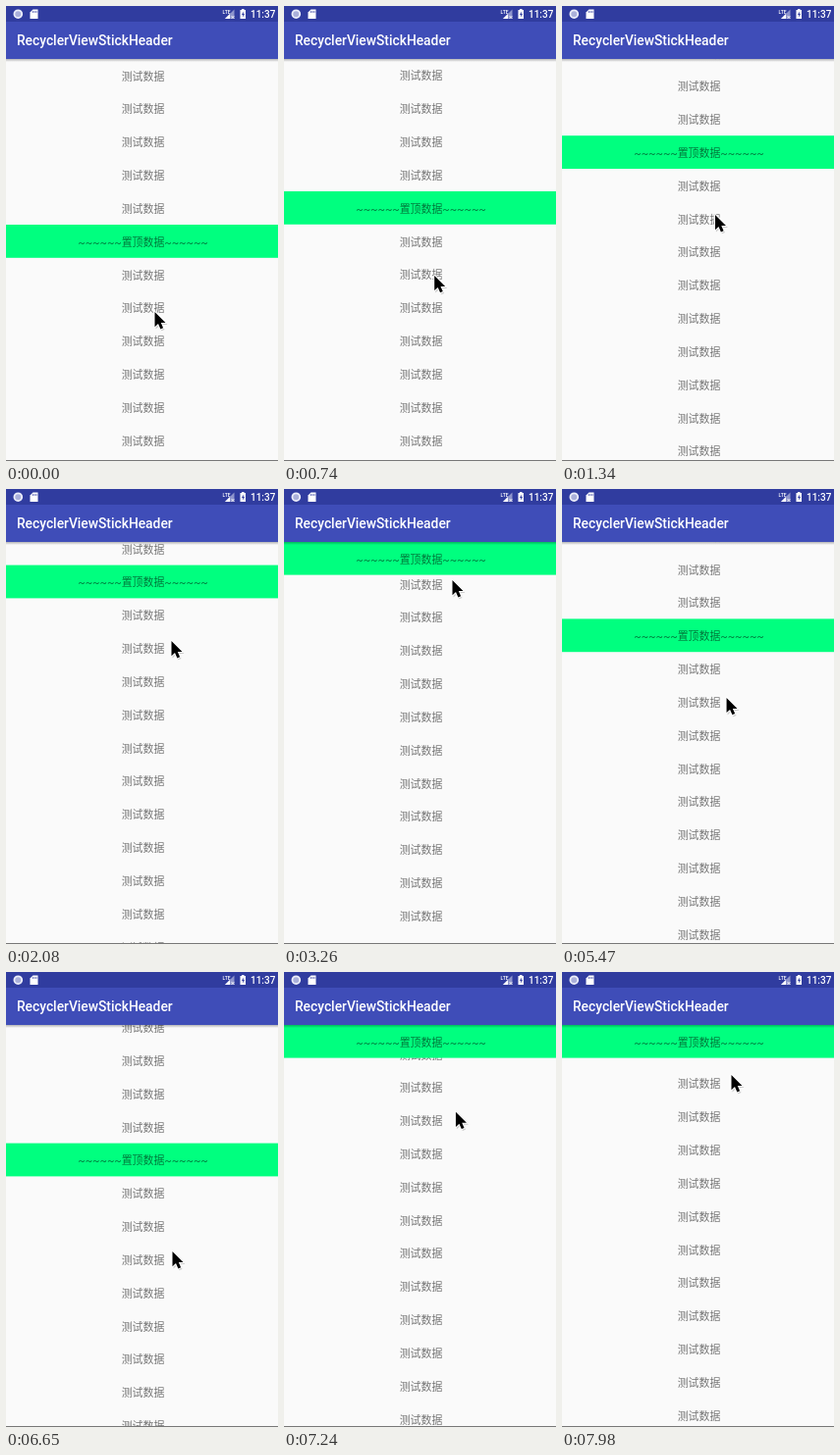
An HTML page for the animation above (8000 ms loop, 277 by 464 pixels).

```html
<!DOCTYPE html>
<html lang="zh">
<head>
<meta charset="utf-8">
<title>RecyclerViewStickHeader</title>
<style>
  html, body { margin: 0; width: 100%; height: 100%; overflow: hidden; background: #fafafa; }
  svg { display: block; }
  text { font-family: Roboto, "Noto Sans CJK SC", "Noto Sans CJK", sans-serif; }
  .row { font-size: 10.9px; fill: rgba(0, 0, 0, .54); text-anchor: middle; }
  .bar { font-weight: 500; fill: #fff; }
</style>
</head>
<body>
<svg width="277" height="464" viewBox="0 0 277 464">
  <defs>
    <linearGradient id="shade" x2="0" y2="1">
      <stop offset="0" stop-opacity=".28"/>
      <stop offset="1" stop-opacity="0"/>
    </linearGradient>
  </defs>
  <rect width="277" height="464" fill="#fafafa"/>
  <g id="list"></g>
  <g id="header">
    <rect y="-17.4" width="277" height="33.8" fill="#00ff7f"/>
    <text class="row" x="139.5" y="4.4">~~~~~~置顶数据~~~~~~</text>
  </g>
  <rect y="463" width="277" height="1" fill="#777"/>

  <rect y="54" width="277" height="3" fill="url(#shade)"/>
  <rect width="277" height="54" fill="#3f4db8"/>
  <rect width="277" height="16" fill="#303c9f"/>
  <text class="bar" x="11" y="40" font-size="13.8">RecyclerViewStickHeader</text>
  <circle cx="12.3" cy="8.2" r="3.9" fill="#aab0da" stroke="#eceefa" stroke-width="1.8"/>
  <path d="M27.5 3.5H32.5V13H24.5V6.5Z" fill="#fff"/>
  <path d="M27.4 5v2M29.2 5v2M31 5v2" stroke="#303c9f" stroke-width=".7"/>
  <text class="bar" x="220.5" y="7.5" font-size="5">LTE</text>
  <path d="M232.5 3.5V13H223Z" fill="#8f96cd"/>
  <path d="M228 8V13H223Z" fill="#fff"/>
  <path d="M229.5 10l3 3m0-3l-3 3" stroke="#fff" stroke-width=".8"/>
  <path d="M240 3h2.5v1H244v9h-5.5V4H240Z" fill="#fff"/>
  <path d="M241.8 5.5L240 9h1.2v2.5L243 8h-1.2Z" fill="#303c9f"/>
  <text class="bar" x="249" y="11.8" font-size="10">11:37</text>

  <g id="cursor">
    <path d="M1 2V17.5l3.5-3.2 2.5 5 3-1.3-2.3-5H13Z" opacity=".18"/>
    <path d="M0 0V15.2l3.5-3.2 2.4 5.4 2.7-1.2-2.3-5.2H11Z" stroke="#fff" stroke-width="2" stroke-linejoin="round" paint-order="stroke"/>
  </g>
</svg>
<script>
const LOOP = 8000, STEP = 147.6, PITCH = 33.83, PINNED = 71.2;
const $ = id => document.getElementById(id);

// Turning points of the two drags: step, pointer x, pointer y, header y
const poses = [
  [1, 151.5, 312, 240.4],
  [9, 156, 213, 149.6],
  [14, 168.5, 155, 95],
  [22, 171.5, 93, 29.5],
  [25, 171.5, 93, 29.5],
  [32, 168.5, 136, 67.8],
  [40, 167, 259, 199],
  [44, 169, 300, 199],
  [45, 169.5, 285, 192],
  [52, 179, 36, -56],
  [54, 172.5, 105, 12.6]
];

function poseAt(step) {
  const i = Math.max(1, poses.findIndex(pose => pose[0] >= step));
  const a = poses[i - 1], b = poses[i];
  const p = Math.max(0, (step - a[0]) / (b[0] - a[0]));
  return a.map((v, j) => v + (b[j] - v) * p);
}

function move(id, x, y) {
  $(id).setAttribute("transform", `translate(${x} ${y})`);
}

for (let i = -5; i <= 17; i++) {
  if (i) $("list").insertAdjacentHTML("beforeend",
    `<text class="row" x="139.5" y="${i * PITCH + 4.4}">测试数据</text>`);
}

// The screen refreshes only once per STEP
function draw(now) {
  const step = Math.floor((now % LOOP - 5) / STEP);
  const [, x, y, header] = poseAt(Math.min(54, step));
  move("list", 0, header);
  move("header", 0, Math.max(header, PINNED));
  move("cursor", x, y);
  requestAnimationFrame(draw);
}
draw(0);
</script>
</body>
</html>
```
